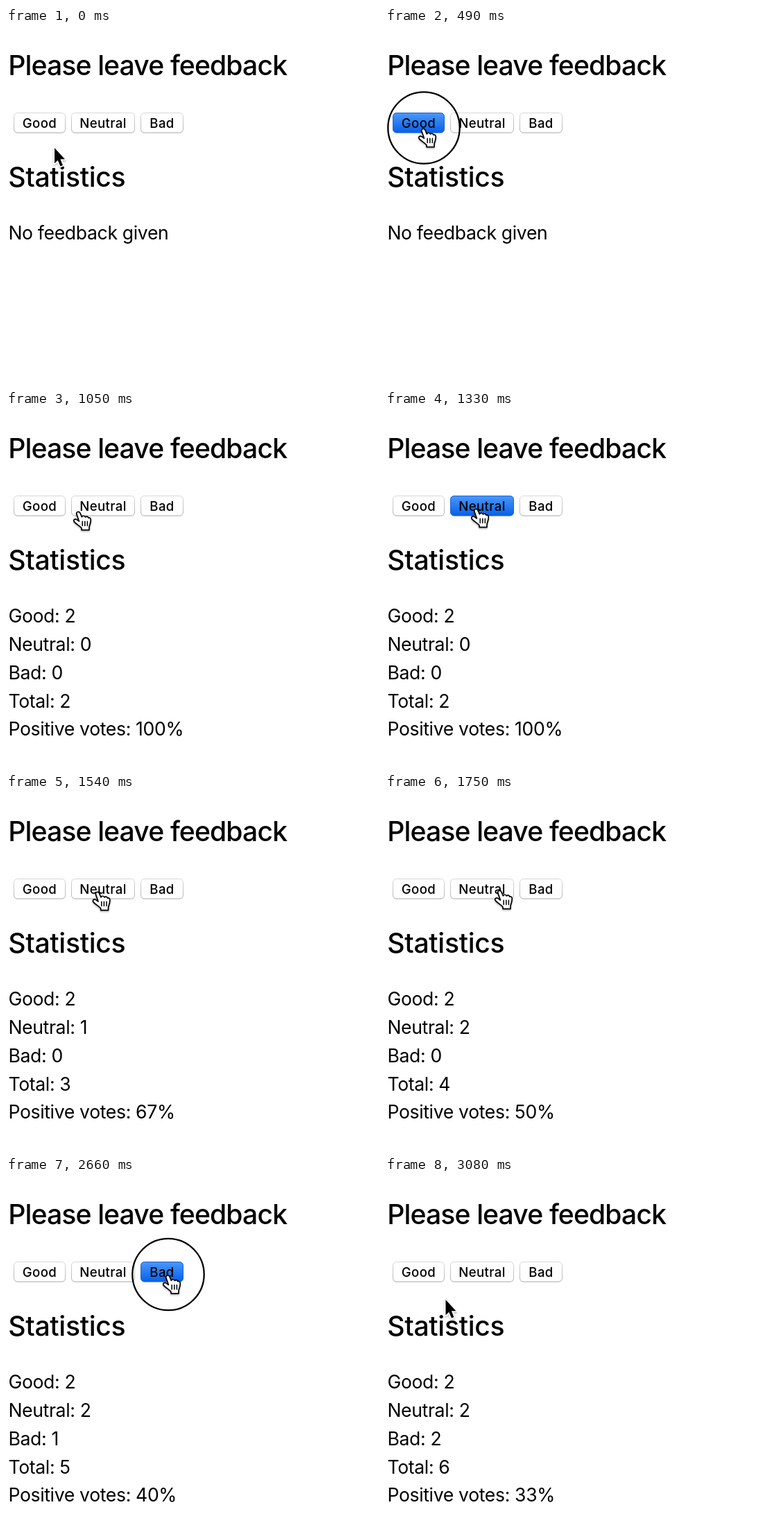
Animation of 538 by 512 pixels, one loop 3.15 s. Source, as an HTML page:

```html
<!DOCTYPE html>
<html lang="en">
<head>
<meta charset="utf-8">
<title>Feedback</title>
<style>
  html, body { margin: 0; width: 100%; height: 100%; overflow: hidden; background: #fff; }
  svg { display: block; }
  text { font-family: Inter, "Liberation Sans", sans-serif; font-optical-sizing: none; }
  .heading { font-size: 39.2px; font-weight: 500; }
  .body { font-size: 26.6px; letter-spacing: -.35px; }
  .label { font-size: 18.6px; font-weight: 500; letter-spacing: .4px; text-anchor: middle; }
</style>
</head>
<body>
<svg width="538" height="512" viewBox="0 0 538 512">
  <defs>
    <linearGradient id="blue" x2="0" y2="1">
      <stop stop-color="#4b98fb"/>
      <stop offset="1" stop-color="#0660ea"/>
    </linearGradient>
    <linearGradient id="edge" x2="0" y2="1">
      <stop stop-color="#d8d8d8"/>
      <stop offset="1" stop-color="#b4b4b4"/>
    </linearGradient>
    <filter id="shadow" x="-50%" y="-50%" width="200%" height="200%">
      <feDropShadow dx="0" dy="1.5" stdDeviation="1.3" flood-opacity=".3"/>
    </filter>
  </defs>
  <text class="heading" x="3.2" y="68.2" letter-spacing="-.9">Please leave feedback</text>
  <text class="heading" x="3.2" y="229.4" letter-spacing="-.32">Statistics</text>
  <g id="buttons"></g>
  <g id="stats"></g>
  <g id="pointer">
    <circle id="ring" r="51.7" fill="none" stroke="#000" stroke-width="2.3"/>
    <path id="arrow" filter="url(#shadow)" fill="#000" stroke="#fff" stroke-width="3.4" paint-order="stroke" stroke-linejoin="round"
      d="M.5 2V24.2L5.2 19.7L9 28.4L12.4 27L8.9 18.2H15.5Z"/>
    <g id="hand" filter="url(#shadow)" fill="#fff" stroke="#000" stroke-width="1.7" stroke-linecap="round" stroke-linejoin="round">
      <path d="M-3.2 4.6C-4 1.2 .4 .2 1.9 3.2L4.4 8.8C5.4 6.6 8.6 6.8 9.4 9C10.6 7.4 13.4 8 13.8 10.2C15.6 9.2 17.4 10.6 17.3 13.4C17.2 18 15.6 20 15 23.5V27.6H4V25C2 22 -3.5 19.5 -6.8 15.6C-8.2 13 -5.6 11 -3 12.6L.4 15Z"/>
      <path d="M5.2 15.2V21.6M8.8 15.2V21.6M12.4 15.2V21.6" stroke-width="1.5"/>
    </g>
  </g>
</svg>
<script>
const LOOP = 3150, STEP = 70;
const $ = id => document.getElementById(id);

const buttons = [
  { name: "Good", x: 11.5, width: 74 },
  { name: "Neutral", x: 94.5, width: 91 },
  { name: "Bad", x: 194.5, width: 61 }
];
const TOP = 122.5, HEIGHT = 28.5;

const clicks = [
  { button: 0, down: 420, ring: 490, up: 560 },
  { button: 0, down: 700, ring: 700, up: 840 },
  { button: 1, down: 1330, ring: 1400, up: 1470 },
  { button: 1, down: 1610, ring: 1610, up: 1680 },
  { button: 2, down: 2380, ring: 2380, up: 2450 },
  { button: 2, down: 2660, ring: 2660, up: 2730 }
];

const linear = p => p;
const easeOut = p => p * (2 - p);
const smooth = p => p * p * (3 - 2 * p);

// Each stop: time, x, y, easing on the way there
const path = [
  [0, 69.5, 171, linear],
  [280, 56, 144, smooth],
  [910, 56, 144, linear],
  [1050, 105, 144, linear],
  [1330, 132, 140, easeOut],
  [1680, 133, 140, linear],
  [1750, 166, 138, linear],
  [2100, 234, 140.5, easeOut],
  [2660, 234, 140.5, linear],
  [3080, 87, 175, smooth],
  [LOOP, 87, 175, linear]
];

function add(parent, tag, attributes, content = "") {
  const node = document.createElementNS("http://www.w3.org/2000/svg", tag);
  for (const key in attributes) node.setAttribute(key, attributes[key]);
  node.textContent = content;
  return parent.appendChild(node);
}

for (const b of buttons) {
  const box = { x: b.x, width: b.width, height: HEIGHT, rx: 5 };
  add($("buttons"), "rect", { ...box, y: TOP + 1, fill: "#000", opacity: .1 });
  b.face = add($("buttons"), "rect", { ...box, y: TOP });
  add($("buttons"), "text", { class: "label", x: b.x + b.width / 2, y: 144.4 }, b.name);
}
const lines = Array.from({ length: 5 }, (_, i) =>
  add($("stats"), "text", { class: "body", x: 3.4, y: 305.4 + i * 40.75 }));

function pointerAt(time) {
  const next = path.findIndex(stop => stop[0] > time);
  const [t0, x0, y0] = path[next - 1], [t1, x1, y1, ease] = path[next];
  const p = ease((time - t0) / (t1 - t0));
  return [x0 + (x1 - x0) * p, y0 + (y1 - y0) * p];
}

function statistics(time) {
  const counts = [0, 0, 0];
  for (const c of clicks) if (time >= c.up) counts[c.button]++;
  const total = counts[0] + counts[1] + counts[2];
  if (!total) return ["No feedback given"];
  return [
    ...buttons.map((b, i) => `${b.name}: ${counts[i]}`),
    `Total: ${total}`,
    `Positive votes: ${Math.round(counts[0] / total * 100)}%`
  ];
}

function show(id, visible) {
  $(id).setAttribute("visibility", visible ? "visible" : "hidden");
}

function draw(now) {
  const time = Math.floor(now % LOOP / STEP) * STEP;
  const click = clicks.find(c => time >= c.down && time < c.up);
  const [x, y] = pointerAt(time);
  const hovering = y >= TOP && y <= TOP + HEIGHT &&
    buttons.some(b => x >= b.x && x <= b.x + b.width);

  buttons.forEach((b, i) => {
    const pressed = click && click.button === i;
    b.face.setAttribute("fill", pressed ? "url(#blue)" : "#fff");
    b.face.setAttribute("stroke", pressed ? "#1b62cf" : "url(#edge)");
  });
  const stats = statistics(time);
  lines.forEach((line, i) => line.textContent = stats[i] || "");

  $("pointer").setAttribute("transform", `translate(${x} ${y})`);
  show("hand", hovering);
  show("arrow", !hovering);
  show("ring", click && time >= click.ring);
  requestAnimationFrame(() => draw(performance.now()));
}
draw(0);
</script>
</body>
</html>
```
